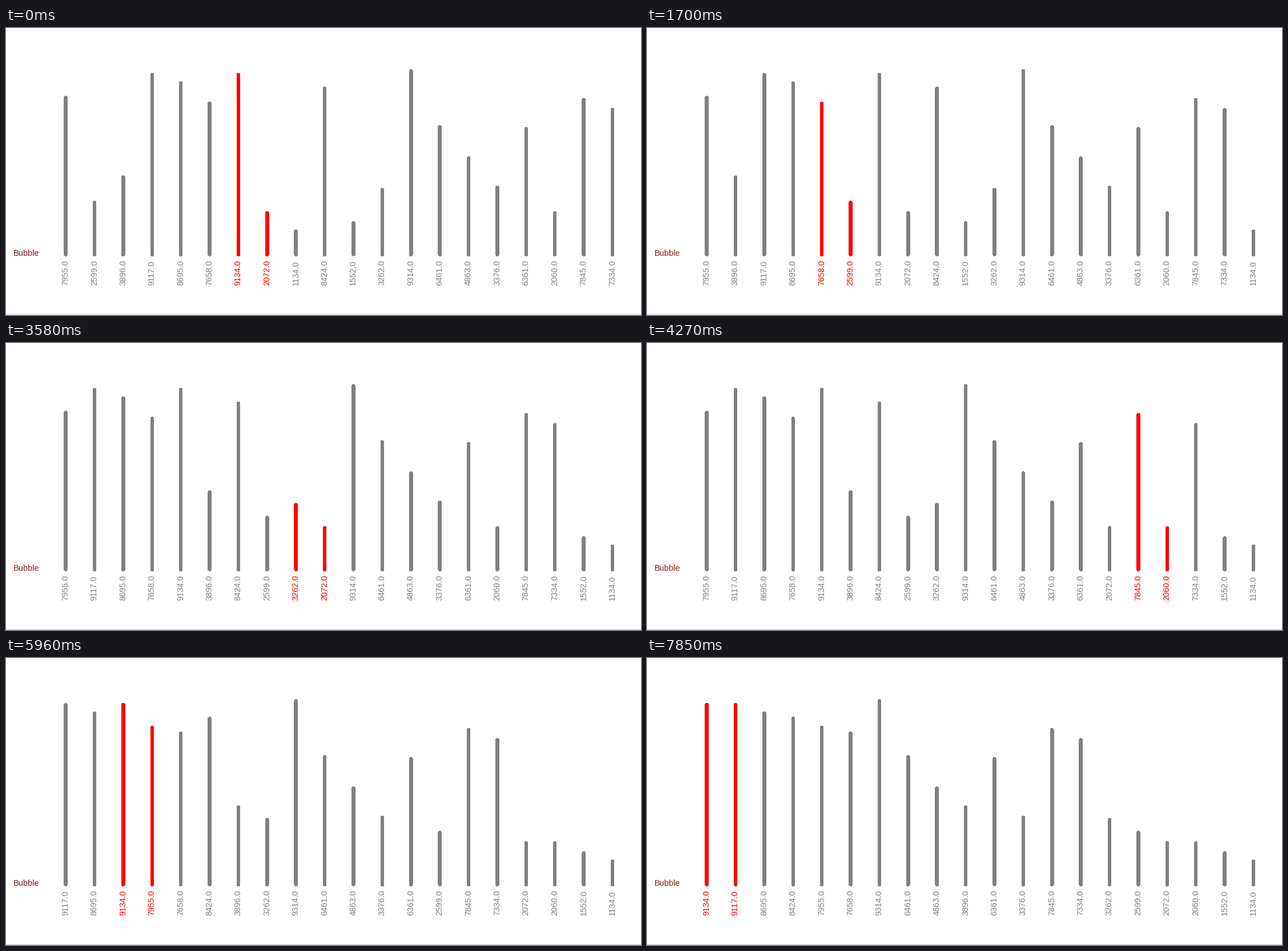
A matplotlib script that plays this animation: 1112 px wide and 504 px high, repeating every 8 s.

```python
import numpy as np
import matplotlib.pyplot as plt
from matplotlib.animation import FuncAnimation

W, H, DPI = 1112, 504, 100
LOOP, STEP = 8000, 20
PX = 72 / DPI  # points per pixel
GREY, RED, LABEL = "#808080", "#ff0000", "#8b1a1a"
plt.rcParams["font.family"] = "Liberation Sans"
plt.rcParams["font.size"] = 14.5 * PX

START = [7955, 2599, 3896, 9117, 8695, 7658, 9134, 2072, 1134, 8424,
         1552, 3262, 9314, 6461, 4863, 3376, 6361, 2060, 7845, 7334]
N = len(START)
SWAPS = 69

# The pace drifts a little: swap numbers and when they happen, in ms.
PACE_SWAP = [0, 15, 32, 43, 49, 52, 62, SWAPS]
PACE_MS = [0, 1700, 3580, 4810, 5740, 5960, 7060, 7850]
TIMES = np.interp(np.arange(SWAPS + 1), PACE_SWAP, PACE_MS)


def bubble_states(values, first, count):
    """Descending bubble sort, resumed mid-pass; one state per swap."""
    values = list(values)
    states = [(tuple(values), first - 1)]
    j = first
    while len(states) <= count:
        if values[j] < values[j + 1]:
            values[j], values[j + 1] = values[j + 1], values[j]
            states.append((tuple(values), j))
        j = (j + 1) % (N - 1)
    return states


STATES = bubble_states(START, 7, SWAPS)

fig = plt.figure(figsize=(W / DPI, H / DPI), dpi=DPI, facecolor="white")
ax = fig.add_axes([0, 0, 1, 1])
ax.set_xlim(0, W)
ax.set_ylim(H, 0)
ax.axis("off")

ax.plot([0, W], [502.5, 502.5], color="#c0c0c0", lw=PX)
ax.text(12.3, 400, "Bubble", color=LABEL)

xs = 104.6 + 50.39 * np.arange(N)
bars = [ax.plot([], [], lw=5.5 * PX, solid_capstyle="round",
                antialiased=False, snap=False)[0] for _ in xs]
tags = [ax.text(x + 3.8, 452.4, "", rotation=90, rotation_mode="anchor",
                ha="left", va="baseline") for x in xs]


def draw(frame):
    k = np.searchsorted(TIMES, frame * STEP + STEP / 2, side="right") - 1
    values, pair = STATES[k]
    for i, (x, v, bar, tag) in enumerate(zip(xs, values, bars, tags)):
        color = RED if i in (pair, pair + 1) else GREY
        bar.set_data([x, x], [397.7, 396 - 0.0344 * v])
        bar.set_color(color)
        tag.set_text(f"{v:.1f}")
        tag.set_color(color)
    return bars + tags


anim = FuncAnimation(fig, draw, frames=LOOP // STEP, interval=STEP,
                     init_func=lambda: draw(0), repeat=True, repeat_delay=0)
plt.show()
```
